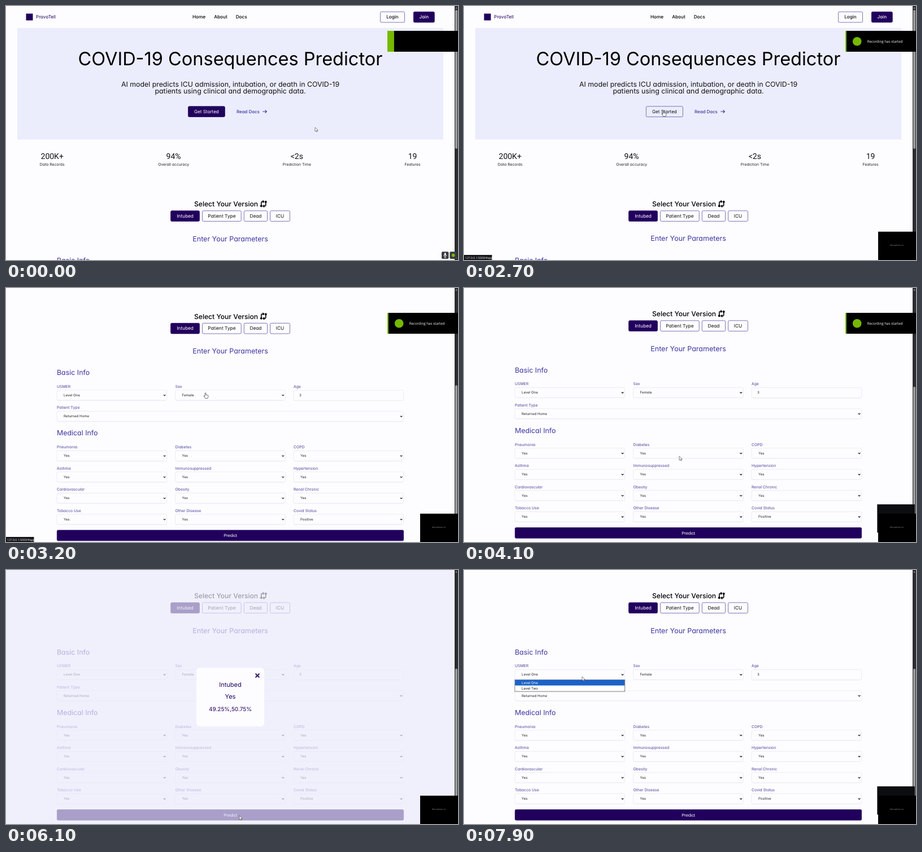
An HTML page that plays this animation: 800x450 px, repeating every 8000 ms.

```html
<!DOCTYPE html>
<html lang="en">
<head>
<meta charset="utf-8">
<title>Consequences Predictor</title>
<style>
html, body { margin: 0; width: 100%; height: 100%; overflow: hidden; background: #fdfcff; }
svg { display: block; width: 800px; height: 450px; }
text {
  font-family: Inter, Lato, sans-serif;
  font-optical-sizing: none;
  font-feature-settings: "cv11";
  text-rendering: geometricPrecision;
}
.num { font-family: Roboto, sans-serif; }
.arial { font-family: "Liberation Sans", Arial, sans-serif; }
.ui { font-family: "Open Sans", sans-serif; }
.hover rect { fill: none; stroke: #4a3f96; }
.hover text { fill: #111; }
</style>
</head>
<body>
<svg id="stage" viewBox="0 0 800 450"></svg>
<script>
const INDIGO = '#21005d', VIOLET = '#3b35a0', PAPER = '#fdfcff', GREEN = '#76b900';
const LOOP = 8000, SCROLL_END = 305;

const rect = (x, y, w, h, fill, more = '') =>
  `<rect x="${x}" y="${y}" width="${w}" height="${h}" fill="${fill}" ${more}/>`;
const text = (x, y, size, str, fill = '#000', more = '') =>
  `<text x="${x}" y="${y}" font-size="${size}" fill="${fill}" ${more}>${str}</text>`;
const mid = (x, y, size, str, fill, more = '') =>
  text(x, y, size, str, fill, 'text-anchor="middle" ' + more);
const group = (id, body, more = '') => `<g id="${id}" ${more}>${body}</g>`;
const path = (d, stroke, width, more = '') =>
  `<path d="${d}" fill="none" stroke="${stroke}" stroke-width="${width}" ${more}/>`;

function button(x, y, w, h, label, filled, more = '', size = 8.1) {
  const box = rect(x, y, w, h, filled ? INDIGO : PAPER, `rx="2" stroke="${filled ? INDIGO : '#4a3f96'}" stroke-width=".7"`);
  return box + mid(x + w / 2, y + h / 2 + 2.8, size, label, filled ? '#fff' : '#111', more);
}

// One labelled form control; y is the top of its box.
function field(x, y, w, label, value, select = true) {
  const right = x + w - 4;
  return text(x, y - 4.2, 6.8, label, '#4b4599') +
    rect(x + .5, y + 1, w - 1, 17.8, '#f0eff5', 'rx="2"') +
    rect(x, y, w, 18, PAPER, 'rx="2" stroke="#e6e5ee" stroke-width=".7"') +
    text(x + (select ? 12 : 10), y + 10.8, 6.1, value, '#222') +
    (select ? path(`M${right - 1.8} ${y + 8.2}l1.8 1.8 1.8-1.8`, '#111', 1.1) : '');
}

function header() {
  const nav = [[341.5, 'Home'], [380, 'About'], [416.7, 'Docs']];
  return rect(35.5, 13.5, 12, 12, INDIGO) + text(53, 22, 8.1, 'PravoTell', INDIGO) +
    nav.map(([x, s]) => mid(x, 22.2, 8.2, s, '#000', 'font-weight="500"')).join('') +
    button(662.5, 10.3, 43, 18.7, 'Login', false, 'font-weight="500"') +
    button(721.3, 10.3, 37, 18.7, 'Join', true, 'font-weight="500"');
}

function hero() {
  return rect(20, 39, 754, 197.5, '#ebedfd') +
    mid(397, 105, 32.5, 'COVID-19 Consequences Predictor') +
    mid(397, 142.7, 12.35, 'AI model predicts ICU admission, intubation, or death in COVID-19', '#111') +
    mid(397, 155.2, 12.35, 'patients using clinical and demographic data.', '#111') +
    group('start', button(322.4, 177.8, 65, 18.6, 'Get Started', true)) +
    text(408, 189.8, 7.9, 'Read Docs', VIOLET, 'font-weight="500"') +
    path('M454.3 187h7M458.6 184.4l2.7 2.6-2.7 2.6', VIOLET, 1.2);
}

function stats() {
  return [[81.7, '200K+', 'Data Records'], [296.6, '94%', 'Overall accuracy'],
          [514.8, '&lt;2s', 'Prediction Time'], [719.5, '19', 'Features']]
    .map(([x, n, s]) => mid(x, 271, 14, n, '#111', 'class="num"') + mid(x, 283.4, 6.8, s, '#222')).join('');
}

function versions() {
  const tabs = [[291.5, 51, 'Intubed'], [347.5, 68.7, 'Patient Type'], [421.3, 41.2, 'Dead'], [467.6, 34.8, 'ICU']];
  return text(333, 355, 12.1, 'Select Your Version', '#000', 'font-weight="500"') +
    path('M451.8 353V348.5q0-2 2-2h2M454.4 344.5l2 2-2 2M459.7 348V352.5q0 2-2 2h-2M457.2 352.5l-2 2 2 2', '#000', 1.6) +
    '<circle cx="451.8" cy="354.3" r="2"/><circle cx="459.7" cy="347" r="2"/>' +
    tabs.map(([x, w, s], i) => button(x, 362.8, w, 18.6, s, !i, '', 8.3)).join('') +
    mid(397, 416.5, 12.5, 'Enter Your Parameters', VIOLET);
}

function form() {
  const cols = [90, 299.6, 509];
  const medical = ['Pneumonia', 'Diabetes', 'COPD', 'Asthma', 'Immunosuppressed', 'Hypertension',
    'Cardiovascular', 'Obesity', 'Renal Chronic', 'Tobacco Use', 'Other Disease', 'Covid Status'];
  return text(90, 454.8, 12.4, 'Basic Info', VIOLET) +
    field(cols[0], 481.3, 194.6, 'USMER', 'Level One') +
    field(cols[1], 481.3, 194.6, 'Sex', 'Female') +
    field(cols[2], 481.6, 194.6, 'Age', '3', false) +
    field(90, 518.8, 613.6, 'Patient Type', 'Returned Home') +
    text(90, 561.8, 12.4, 'Medical Info', VIOLET) +
    medical.map((s, i) => field(cols[i % 3], 588.8 + 37.5 * (i / 3 | 0), 194.6, s, i < 11 ? 'Yes' : 'Positive')).join('') +
    group('predict', button(90.3, 729.5, 613.4, 18.8, 'Predict', true, 'class="arial"', 7.6));
}

function modal() {
  const lines = [['Intubed', 207.2], ['Yes', 228.3], ['49.25%,50.75%', 249.5]];
  return rect(0, 0, 794, 450, '#ebebfd', 'opacity=".68"') +
    rect(337, 173.3, 120, 103.7, PAPER, 'rx="6"') +
    path('M441.6 183.6l6.8 6.8M448.4 183.6l-6.8 6.8', INDIGO, 1.9) +
    lines.map(([s, y], i) => mid(397, y, i < 2 ? 11 : 10, s, INDIGO)).join('');
}

const dropdown = rect(89, 194.5, 197, 22, '#000', 'opacity=".1"') +
  rect(90, 194.5, 194.6, 20.5, '#fff', 'stroke="#777" stroke-width=".8"') +
  rect(90.3, 194.7, 194, 9.9, '#1b62c8') +
  text(102, 201.6, 6.1, 'Level One', '#fff') + text(102, 211.8, 6.1, 'Level Two', '#111');

const scrollbar = rect(794, 0, 6, 450, '#2b2b30') +
  '<path d="M795.2 4.5h3.6l-1.8-2.6zM795.2 445.5h3.6l-1.8 2.6z" fill="#9b9b9b"/>' +
  rect(795, 7, 4, 246, '#9b9b9b', 'id="thumb" rx="2"');

const toast = rect(675, 44, 125, 37, GREEN) +
  rect(677, 44, 123, 37, '#000', 'id="panel"') +
  group('notice', `<circle cx="695.7" cy="62.8" r="7.8" fill="${GREEN}"/>` +
    text(713.7, 65.4, 6.2, 'Recording has started', '#fff', 'class="ui" font-weight="500"'));

const recorder = rect(771, 435.3, 12.4, 12.6, '#3a3c40', 'rx="2"') +
  rect(785.4, 435.3, 12.4, 12.6, '#3a3c40', 'rx="2"') +
  rect(775.8, 437.3, 2.8, 5, '#fff', 'rx="1.4"') +
  path('M774.6 441q0 2.7 2.6 2.7t2.6-2.7M777.2 443.6v2M775.4 445.8h3.6', '#fff', .8) +
  `<circle cx="791.6" cy="441.6" r="2.9" fill="${GREEN}"/>`;

const status = rect(0, 441, 49.5, 9, '#15161a') +
  text(2, 447.6, 5.1, '127.0.0.1:5000/#app', '#fff', 'class="ui" font-weight="500"');

const arrow = '<path d="M0 0v7.2l1.7-1.5 1.2 2.5 1.2-.6-1.1-2.4h2.3z" fill="#fff" stroke="#333" stroke-width=".6"/>';
const hand = '<path d="M-.9.9q.9-1.4 1.7 0v3l3.2.8q1.1.4 1 1.6l-.5 2.4-.8 1.6h-3.9l-2.6-3.6q-.3-1.2.9-.9l1 .9z" fill="#fff" stroke="#333" stroke-width=".7"/>';

const stage = document.getElementById('stage');
stage.innerHTML = rect(0, 0, 800, 450, PAPER) +
  group('page', header() + hero() + stats() + versions() + form()) +
  group('dropdown', dropdown) + group('modal', modal()) + scrollbar +
  group('status', status) + group('toast', toast) + group('recorder', recorder) +
  group('backdrop', rect(731.3, 383.3, 66.7, 50, '#0c0d11')) +
  group('panelBox', rect(733, 399.8, 67, 50.2, '#000') +
    mid(766, 425, 3.4, 'Microphone on', '#999', 'class="ui"')) +
  group('cursor', group('arrow', arrow) + group('hand', hand));

const el = id => document.getElementById(id);
const within = (t, a, b) => t >= a && t < b;
const show = (id, on) => el(id).setAttribute('display', on ? 'inline' : 'none');
const move = (id, x, y) => el(id).setAttribute('transform', `translate(${x} ${y})`);
const ramp = (t, a, b) => Math.min(1, Math.max(0, (t - a) / (b - a)));
const ease = (t, a, b) => { const p = ramp(t, a, b); return p * p * (3 - 2 * p); };

// Pointer stops: time, x, y
const stops = [[0, 547, 215], [500, 547, 215], [1700, 360, 226], [1950, 360, 226], [2300, 353, 185.3],
  [3300, 353, 185.3], [4100, 381, 298], [4900, 413, 435.3], [6150, 413, 435.3], [6600, 445, 187],
  [6900, 445, 187], [7700, 209, 189], [LOOP, 209, 189]];

function pointer(t) {
  const i = stops.findIndex((s, k) => k && t <= s[0]);
  const [t0, x0, y0] = stops[i - 1], [t1, x1, y1] = stops[i];
  const p = ease(t, t0, t1);
  return [x0 + (x1 - x0) * p, y0 + (y1 - y0) * p];
}

function draw(t) {
  const scroll = SCROLL_END * ease(t, 2700, 3240);
  move('page', 0, -scroll);
  move('thumb', 0, scroll * .55);

  const onStart = within(t, 2185, 3300), onPredict = within(t, 4750, 5400), open = within(t, 5400, 6850);
  el('start').classList.toggle('hover', onStart);
  el('predict').classList.toggle('hover', onPredict);
  show('status', within(t, 2200, 3700));
  show('modal', open);
  show('dropdown', t >= 7900);

  show('toast', t < 5700);
  move('toast', 125 * ramp(t, 5500, 5700), 0);
  move('panel', 10 * (1 - ramp(t, 0, 100)), 0);
  el('notice').setAttribute('opacity', ramp(t, 150, 400));
  show('recorder', t < 2500);
  show('panelBox', t >= 2500);
  show('backdrop', t >= 3300 && !open);

  const pressing = onStart || onPredict || within(t, 6570, 6850);
  show('hand', pressing);
  show('arrow', !pressing);
  move('cursor', ...pointer(t));
}

function tick(now) {
  draw(now % LOOP);
  requestAnimationFrame(tick);
}
draw(0);
requestAnimationFrame(tick);
</script>
</body>
</html>
```
